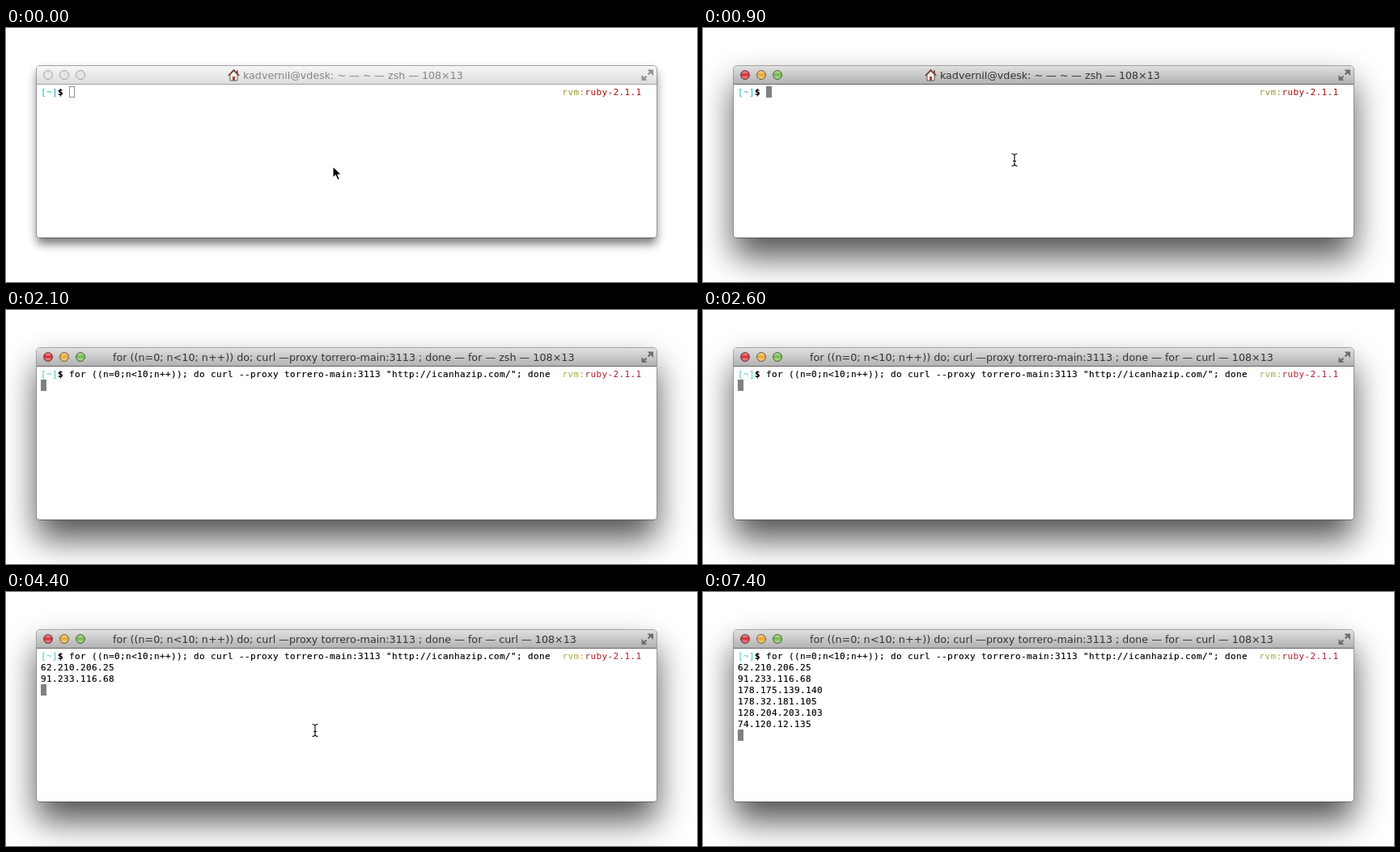
These frames come from a looping animation (854 px wide and 314 px high, 8000 ms). An HTML page:

```html
<!DOCTYPE html>
<html lang="en">
<head>
<meta charset="utf-8">
<title>Terminal session</title>
<style>
  html, body { margin: 0; width: 100%; height: 100%; overflow: hidden; background: #fff; }
  svg { display: block; }
  text { white-space: pre; }
  .title { font-family: "DejaVu Sans", sans-serif; fill: #333; }
  .mono {
    font: 11px "DejaVu Sans Mono", monospace; letter-spacing: .378px;
    fill: #000; stroke: #000; stroke-width: .15px;
  }
  .path { fill: #18b4b8; stroke: none; }
  .rvm { fill: #98982a; stroke: none; }
  .ruby { fill: #a80a0a; stroke: none; }
  .late .path { fill: #48c4c8; }
  .late .rvm { fill: #aaa84c; }
  .late .ruby { fill: #b01c2c; }
  .idle .title { fill: #858585; }
  .idle .on, svg:not(.idle) .off { display: none; }
  #caret { fill: #808080; }
  .idle #caret { fill: #fff; stroke: #909090; }
  .idle #expand { opacity: .7; }
</style>
</head>
<body>
<svg id="stage" class="idle" width="854" height="314" viewBox="0 0 854 314">
  <defs>
    <linearGradient id="barOn" x2="0" y2="1"><stop stop-color="#e0e0e0"/><stop offset="1" stop-color="#b0b0b0"/></linearGradient>
    <linearGradient id="barOff" x2="0" y2="1"><stop stop-color="#f6f6f6"/><stop offset="1" stop-color="#dcdcdc"/></linearGradient>
    <linearGradient id="gloss" x2="0" y2="1">
      <stop stop-color="#fff" stop-opacity=".6"/><stop offset=".45" stop-color="#fff" stop-opacity="0"/>
      <stop offset="1" stop-color="#fff" stop-opacity=".5"/>
    </linearGradient>
    <filter id="wide" x="-20%" y="-50%" width="140%" height="200%"><feGaussianBlur stdDeviation="21"/></filter>
    <filter id="tight" x="-20%" y="-50%" width="140%" height="200%"><feGaussianBlur stdDeviation="6"/></filter>
  </defs>

  <rect class="on" x="38" y="69" width="766" height="214" rx="5" opacity=".68" filter="url(#wide)"/>
  <rect class="off" x="38" y="53" width="766" height="214" rx="5" opacity=".52" filter="url(#tight)"/>
  <rect x="37.5" y="46.5" width="767" height="213" rx="4.5" fill="#fff" stroke="#000" stroke-opacity=".34"/>
  <path class="on" d="M38 70V51q0-4 4-4H800q4 0 4 4V70z" fill="url(#barOn)"/>
  <path class="off" d="M38 70V51q0-4 4-4H800q4 0 4 4V70z" fill="url(#barOff)"/>
  <path class="on" d="M38 69.5H804" stroke="#666"/>
  <path class="off" d="M38 69.5H804" stroke="#a0a0a0"/>
  <path d="M41 259.5H801" stroke="#000" stroke-opacity=".25"/>
  <g id="lights"></g>

  <g id="expand" fill="#6e6e6e" stroke="#6e6e6e" stroke-width="2.2">
    <path d="M793.6 57.4L797 54M791.4 59.6L788 63" fill="none"/>
    <path d="M792.5 51.5h7.5V59zM785.5 58v7H792.5z" stroke="none"/>
  </g>

  <g id="home">
    <path d="M277 57.5V65h9V57.5L281.5 53z" fill="#f4eee4" stroke="#5c4c44" stroke-width=".9"/>
    <path d="M285 52.5h1.8v4H285z" fill="#8c4438"/>
    <path d="M274.8 59L281.5 52L288.2 59" fill="none" stroke="#6b4038" stroke-width="1.6"/>
    <path d="M280 60h3v5h-3z" fill="#9c4a38"/>
  </g>
  <text id="title" class="title" y="63"></text>

  <rect id="caret" width="7" height="14"/>
  <text class="mono" x="43" y="83"><tspan class="path">[~]</tspan><tspan font-weight="bold">$</tspan></text>
  <text class="mono" x="687.5" y="83"><tspan class="rvm">rvm:</tspan><tspan class="ruby">ruby-2.1.1</tspan></text>
  <text id="command" class="mono" x="78" y="83"></text>
  <g id="output"></g>

  <path id="arrow" d="M0 0V14.2L3.3 11.2L5.8 16.8L8.4 15.7L5.9 10.2H10.2z" stroke="#fff" stroke-width="1.1"/>
  <g id="beam" fill="none">
    <path d="M-3.5-7.5Q0-7.5 0-5V5Q0 7.5-3.5 7.5M3.5-7.5Q0-7.5 0-5M0 5Q0 7.5 3.5 7.5M-2 1.5H2" stroke="#fff" stroke-width="2.6" stroke-opacity=".7"/>
    <path d="M-3.5-7.5Q0-7.5 0-5V5Q0 7.5-3.5 7.5M3.5-7.5Q0-7.5 0-5M0 5Q0 7.5 3.5 7.5M-2 1.5H2" stroke="#111" stroke-width="1.2"/>
  </g>
</svg>
<script>
const LOOP = 8000, LEFT = 43, TOP = 72, CELL = 7, ROW = 14;
const FOCUS = 200, FADE = 1000, TYPED = 1300, ENTER = 2100, FETCH = 2500;
const COMMAND = 'for ((n=0;n<10;n++)); do curl --proxy torrero-main:3113 "http://icanhazip.com/"; done';
const JOB = 'for ((n=0; n<10; n++)) do; curl —proxy torrero-main:3113 ; done — for — ';
const REPLIES = [
  [3100, '62.210.206.25'], [3800, '91.233.116.68'], [4700, '178.175.139.140'],
  [5300, '178.32.181.105'], [6400, '128.204.203.103'], [7400, '74.120.12.135']
];
// time, shape, x, y
const POINTER = [
  [0, 'arrow', 404, 171], [100, 'arrow', 398, 168], [200, 'beam', 390, 165], [300, 'beam', 385, 163],
  [TYPED, ''],
  [4100, 'beam', 385, 163], [4200, 'beam', 384, 166], [4300, 'beam', 383, 169], [4400, 'beam', 382, 171],
  [5100, 'beam', 382, 190], [5200, 'beam', 381, 212], [5300, 'beam', 380, 245], [5400, 'arrow', 379, 285],
  [5500, '']
];

const $ = id => document.getElementById(id);
const show = (el, on) => { el.style.display = on ? '' : 'none'; };

function add(parent, name, attrs, text = '') {
  const el = document.createElementNS('http://www.w3.org/2000/svg', name);
  for (const key in attrs) el.setAttribute(key, attrs[key]);
  el.textContent = text;
  return parent.appendChild(el);
}

['#d22f38', '#e6a536', '#72b84a'].forEach((color, i) => {
  const spot = { cx: 52 + 20 * i, cy: 58, r: 5.5 };
  add($('lights'), 'circle', { ...spot, class: 'on', fill: color, stroke: '#000', 'stroke-opacity': .45 });
  add($('lights'), 'circle', { ...spot, class: 'on', r: 4.6, fill: 'url(#gloss)' });
  add($('lights'), 'circle', { ...spot, class: 'off', fill: '#e6e6e6', stroke: '#a2a2a2' });
});

const lines = REPLIES.map(([, ip], i) =>
  add($('output'), 'text', { class: 'mono', x: LEFT, y: TOP + 11 + ROW * (i + 1) }, ip));
$('command').textContent = COMMAND;

function setTitle(text, x, size) {
  const el = $('title');
  if (el.textContent === text) return;
  el.textContent = text;
  el.setAttribute('x', x);
  el.style.fontSize = size + 'px';
}

function draw(t) {
  $('stage').classList.toggle('idle', t < FOCUS);
  $('stage').classList.toggle('late', t >= FADE);

  const running = t >= ENTER;
  show($('home'), !running);
  if (running) setTitle(JOB + (t < FETCH ? 'zsh' : 'curl') + ' — 108×13', 132, 12.72);
  else setTitle('kadvernil@vdesk: ~ — ~ — zsh — 108×13', 293, 12.67);

  show($('command'), t >= TYPED);
  let count = 0;
  REPLIES.forEach(([at], i) => {
    show(lines[i], t >= at);
    if (t >= at) count++;
  });

  const col = running ? 0 : 5 + (t >= TYPED ? COMMAND.length : 0);
  const row = running ? 1 + count : 0;
  const inset = t < FOCUS ? .5 : 0;
  const caret = $('caret');
  caret.setAttribute('x', LEFT + CELL * col + inset);
  caret.setAttribute('y', TOP + ROW * row + inset);
  caret.setAttribute('width', CELL - 2 * inset);
  caret.setAttribute('height', ROW - 2 * inset);

  const [, shape, x, y] = POINTER.filter(p => p[0] <= t).pop();
  for (const id of ['arrow', 'beam']) show($(id), id === shape);
  if (shape) $(shape).setAttribute('transform', `translate(${x} ${y})`);
}

const start = performance.now();
function tick() {
  draw((performance.now() - start) % LOOP);
  requestAnimationFrame(tick);
}
tick();
</script>
</body>
</html>
```
